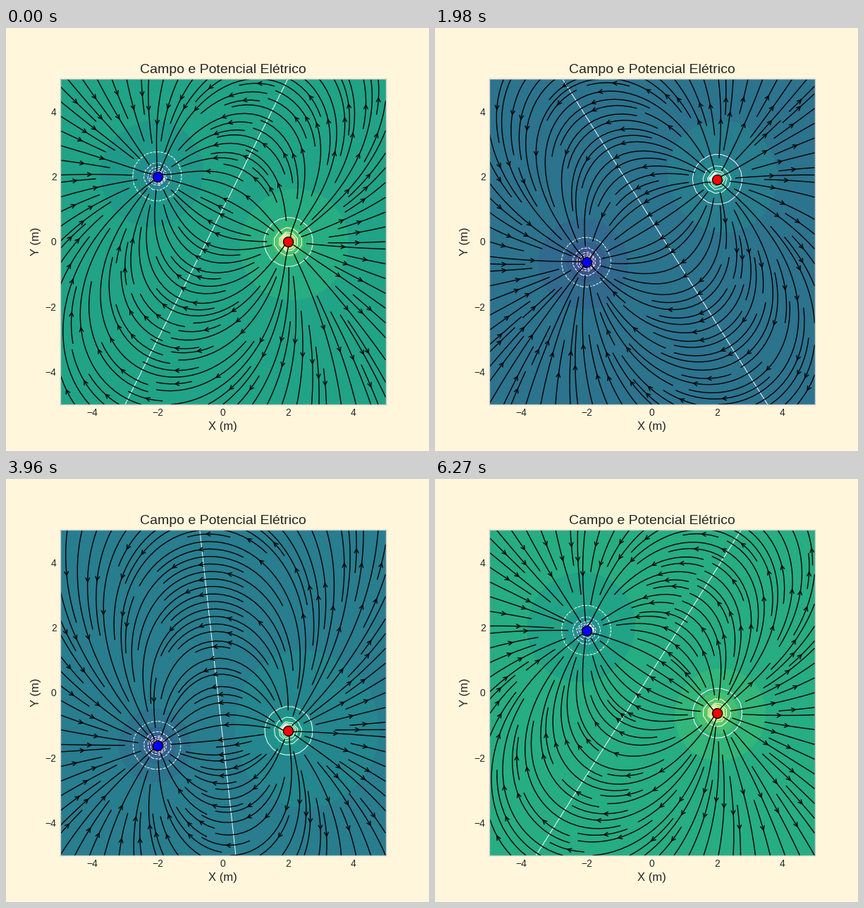
Write a matplotlib script that moves like this. It is 600 px wide and 600 px high and loops after 6600 ms.

```python
import numpy as np
import matplotlib.pyplot as plt
from matplotlib.animation import FuncAnimation

plt.rcParams.update({
    "font.family": "Liberation Sans",
    "text.color": "0.15",
    "axes.labelcolor": "0.15",
    "axes.edgecolor": "0.8",
    "axes.linewidth": 1,
    "xtick.color": "0.15",
    "ytick.color": "0.15",
    "xtick.major.size": 0,
    "ytick.major.size": 0,
})

FRAMES = 20
K = 8.99e9
CHARGE = 1e-9
BACKGROUND = "#fff6dc"

axis = np.linspace(-5, 5, 50)
X, Y = np.meshgrid(axis, axis)

fig, ax = plt.subplots(figsize=(6, 6), dpi=100, facecolor=BACKGROUND)


def charges(i):
    t = 2 * np.pi * i / FRAMES
    return [(-CHARGE, -2, 2 * np.cos(t), "blue"),
            (CHARGE, 2, 2 * np.sin(t), "red")]


def field(points):
    """Potential and field components of the point charges on the grid."""
    v, ex, ey = (np.zeros_like(X) for _ in range(3))
    for q, x, y, _ in points:
        dx, dy = X - x, Y - y
        r = np.hypot(dx, dy)
        v += K * q / r
        ex += K * q * dx / r**3
        ey += K * q * dy / r**3
    return v, ex, ey


def draw(i):
    ax.clear()
    points = charges(i)
    v, ex, ey = field(points)

    ax.contourf(X, Y, v, levels=np.linspace(v.min(), v.max(), 26),
                cmap="viridis")
    ax.contour(X, Y, v, levels=20, colors="white", linewidths=0.7)
    ax.streamplot(X, Y, ex, ey, color="black", linewidth=1, density=1.5,
                  arrowstyle="->", arrowsize=1)
    for _, x, y, color in points:
        ax.plot(x, y, "o", color=color, markersize=10,
                markeredgecolor="black", markeredgewidth=1, zorder=5)

    ax.set(xlim=(-5, 5), ylim=(-5, 5), aspect="equal",
           xticks=range(-4, 5, 2), yticks=range(-4, 5, 2))
    ax.set_title("Campo e Potencial Elétrico", fontsize=14)
    ax.set_xlabel("X (m)", fontsize=12)
    ax.set_ylabel("Y (m)", fontsize=12)


anim = FuncAnimation(fig, draw, frames=FRAMES, interval=330,
                     init_func=lambda: [], repeat=True, repeat_delay=0)
plt.show()
```
